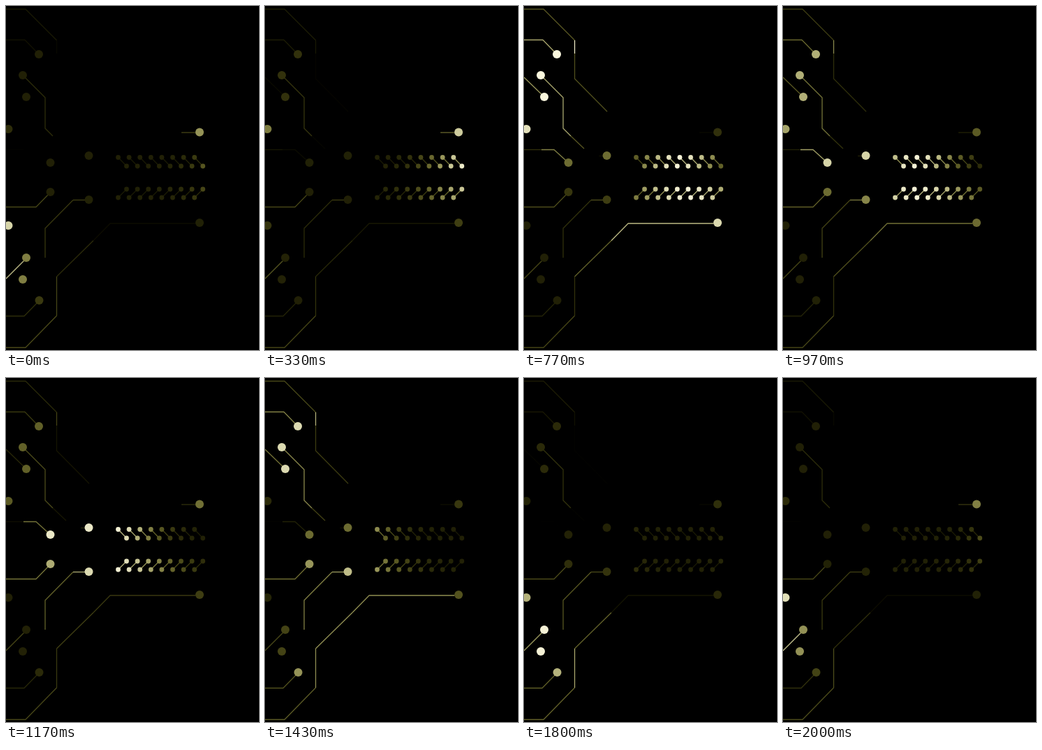
These frames come from a looping animation (362x492 px, 2.03 s). An HTML page with a canvas:

```html
<!DOCTYPE html>
<html lang="en">
<head>
<meta charset="utf-8">
<title>Circuit lights</title>
<style>
html, body { margin: 0; width: 100%; height: 100%; overflow: hidden; background: #000; }
canvas { display: block; }
</style>
</head>
<body>
<canvas id="stage" width="362" height="492"></canvas>
<script>
const ctx = document.getElementById('stage').getContext('2d');
const LOOP = 2030;
const PIN_PAIRS = 8;
const parts = [];

// A soft flash around the time `peak`, repeating every loop.
const pulse = (peak, gain = 1, width = 190) => t => {
  const d = (t - peak + LOOP * 1.5) % LOOP - LOOP / 2;
  return gain * Math.exp(-d * d / (2 * width * width));
};
const sum = (...pulses) => t => pulses.reduce((s, p) => s + p(t), 0);
const dim = (gain, glow) => t => gain * glow(t);

function trace(d, base, glow) {
  parts.push({ path: new Path2D(d), base, glow });
}
function dot(x, y, r, base, glow) {
  const path = new Path2D();
  path.arc(x, y, r, 0, Math.PI * 2);
  parts.push({ path, base, glow, filled: true });
}
const pad = (x, y, glow) => dot(x, y, 6, 0.13, glow);

// A row of linked pins lit by a wave running from right to left.
function pins(yLeft, yRight, first, last, width) {
  for (let i = 0; i < PIN_PAIRS; i++) {
    const x = 160.5 + i * 15.6;
    const wave = n => pulse(last + (first - last) * n / PIN_PAIRS, 0.85, width);
    trace(`M${x} ${yLeft}L${x + 12} ${yRight}`, 0.1, dim(0.75, wave(i)));
    dot(x, yLeft, 3.4, 0.13, wave(i));
    dot(x + 12, yRight, 3.4, 0.13, wave(i + 1));
  }
}

const north = sum(pulse(770), pulse(1440, 0.75, 150));
const west = pulse(700, 0.8, 300);
const hub = pulse(1100, 0.85, 230);
const lowerHub = pulse(1260, 0.8, 250);
const south = pulse(1790, 0.85);
const southEast = pulse(1640, 0.85);

// Upper left
trace('M0 4.5H28L72.5 49', 0.1, dim(0.25, north));
trace('M72.5 49V68', 0.03, dim(0.9, north));
trace('M72.5 68V104L119 151', 0, dim(0.32, north));
trace('M0 48.5H27L43 65', 0.07, dim(0.6, north));
pad(47, 69, north);
trace('M24 99L56 131V175L67 186', 0.18, dim(0.5, north));
trace('M67 186L86 204', 0, dim(0.35, north));
pad(24, 99, north);
trace('M0 102L29 130', 0, dim(0.6, north));
pad(29, 130, north);
pad(3.5, 176, west);

// Hub
trace('M0 205.5H25', 0, dim(0.25, west));
trace('M25 205.5H43L60 221', 0, pulse(950, 0.65, 270));
pad(63.5, 224, hub);
trace('M0 287.5H43L63 267', 0.28, dim(0.25, lowerHub));
pad(63.5, 266, dim(0.75, lowerHub));
trace('M107 214.5H113', 0, dim(0.18, hub));
pad(118.5, 214, hub);
trace('M56 360V318L96 277.5', 0.17, pulse(1450, 0.35, 300));
trace('M96 277.5H113', 0.25, dim(0.6, lowerHub));
pad(118.5, 277, lowerHub);

// Lower left
pad(3.5, 314, pulse(1950, 0.8));
trace('M0 390L29 361', 0.28, pulse(1970, 0.5));
pad(29, 360, south);
pad(24, 391, south);
trace('M0 443.5H26L47 422', 0.14, dim(0.4, southEast));
pad(47.5, 421, southEast);

// Long trace to the lower right
trace('M0 488.5H28L72.5 443', 0.28, dim(0.2, southEast));
trace('M72.5 443V387', 0.2, dim(0.8, southEast));
trace('M72.5 387L125 335.5', 0.15, sum(pulse(800, 0.25), pulse(1560, 0.55)));
trace('M125 335.5L149 311H271', 0.05, dim(0.7, north));
pad(277, 310, sum(pulse(700, 0.8), pulse(1430, 0.2)));

// Short trace to the upper right
const east = sum(pulse(210, 0.85), pulse(1130, 0.33));
trace('M251 181H271', 0, dim(0.6, east));
pad(277, 180.5, east);

pins(216.5, 229, 400, 1150, 240);
pins(274, 262, 520, 1130, 280);

function draw(t) {
  ctx.fillStyle = '#000';
  ctx.fillRect(0, 0, 362, 492);
  ctx.lineWidth = 1.3;
  ctx.lineJoin = 'round';
  for (const { path, base, glow, filled } of parts) {
    const b = Math.min(1, base + glow(t));
    const color = `rgb(${250 * b},${247 * b},${222 * b ** 1.8})`;
    if (filled) {
      ctx.fillStyle = color;
      ctx.fill(path);
    } else {
      ctx.strokeStyle = color;
      ctx.stroke(path);
    }
  }
}

const start = performance.now();
function tick() {
  draw((performance.now() - start) % LOOP);
  requestAnimationFrame(tick);
}
tick();
</script>
</body>
</html>
```
